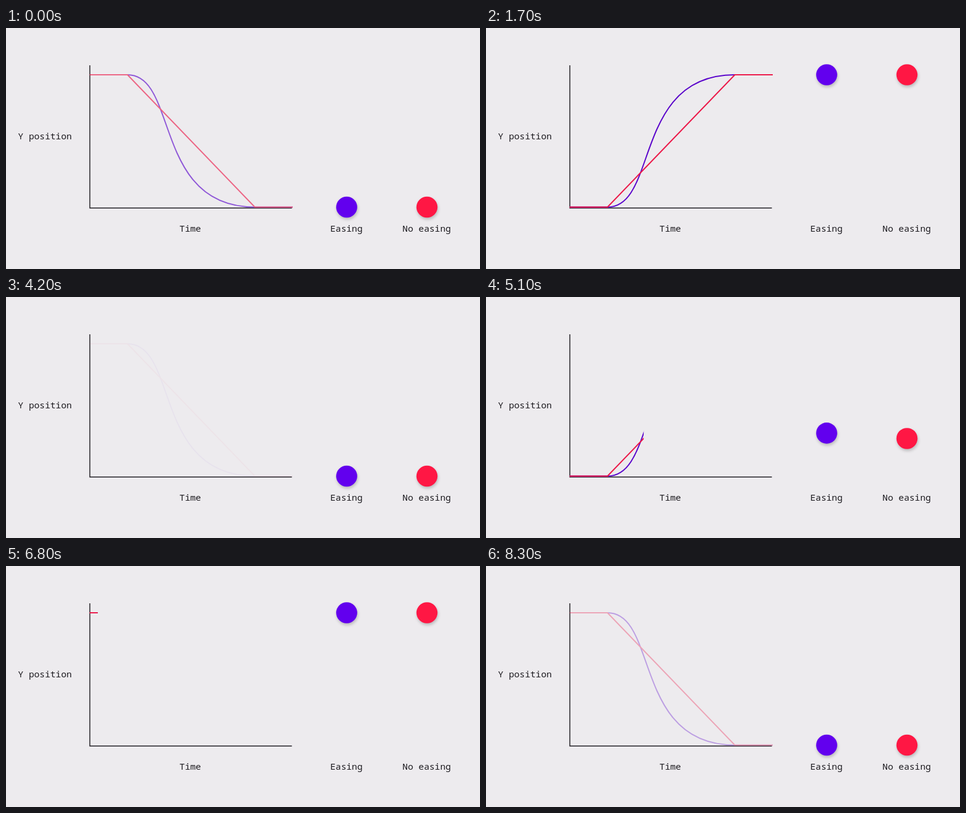
An HTML page that plays this animation: 800 by 407 pixels, repeating every 8.4 s.

```html
<!DOCTYPE html>
<html lang="en">
<head>
<meta charset="utf-8">
<title>Easing comparison</title>
<style>
  html, body { margin: 0; width: 100%; height: 100%; overflow: hidden; background: #edebee; }
  svg { display: block; width: 100%; height: 100%; }
  text { font: 500 15.15px "Roboto Mono", "Noto Sans Mono", "DejaVu Sans Mono", monospace; fill: #1c1a1f; text-anchor: middle; }
  path { fill: none; stroke-width: 2; stroke-linejoin: round; }
  circle { filter: drop-shadow(1px 3px 2.5px rgba(0, 0, 0, .22)); }
</style>
</head>
<body>
<svg viewBox="0 0 800 407">
  <clipPath id="reveal"><rect id="window" x="141" y="50" height="270"/></clipPath>
  <path d="M141.5 63V304H482.5" stroke="#1c1a1f" style="stroke-width:1.5;stroke-linejoin:miter"/>
  <g id="curves" clip-path="url(#reveal)">
    <path id="easedLine" stroke="#5a04cb"/>
    <path id="linearLine" stroke="#ec1848"/>
  </g>
  <text x="65.7" y="188">Y position</text>
  <text x="311" y="344">Time</text>
  <text x="574.5" y="344">Easing</text>
  <text x="710" y="344">No easing</text>
  <circle id="easedBall" cx="575" r="17.8" fill="#6200ee"/>
  <circle id="linearBall" cx="710.5" r="17.8" fill="#ff1744"/>
</svg>
<script>
const LOOP = 8400, STEP = 100;              // the picture advances ten times a second
const CYCLE = 4133.3, RISE_AT = 2132, START_PHASE = 1504;
const SPEED = 0.3695;                       // horizontal px per ms
const FADE_END = 1574, FADE_TIME = 111;
const LEFT = 141, RIGHT = 484, RAMP_START = 205, RAMP_END = 420;
const TOP = 79, BOTTOM = 302.5;

const byId = id => document.getElementById(id);
const clamp = v => Math.min(1, Math.max(0, v));
const mix = (a, b, k) => a + (b - a) * k;

// cubic-bezier(.4, 0, .2, 1), solved by bisection
function ease(x) {
  let lo = 0, hi = 1;
  for (let i = 0; i < 24; i++) {
    const s = (lo + hi) / 2, r = 1 - s;
    if (1.2 * r * r * s + 0.6 * r * s * s + s ** 3 < x) lo = s; else hi = s;
  }
  return 3 * (1 - lo) * lo * lo + lo ** 3;
}

function draw(time) {
  const phase = (time + START_PHASE) % CYCLE;
  const rising = phase >= RISE_AT;
  const elapsed = rising ? phase - RISE_AT : phase;
  const [from, to] = rising ? [BOTTOM, TOP] : [TOP, BOTTOM];
  const x = Math.min(RIGHT, LEFT + SPEED * elapsed);
  const progress = clamp((x - RAMP_START) / (RAMP_END - RAMP_START));
  const c1 = mix(RAMP_START, RAMP_END, 0.4), c2 = mix(RAMP_START, RAMP_END, 0.2);
  const lead = `M${LEFT} ${from}H${RAMP_START}`;

  byId('easedLine').setAttribute('d', `${lead}C${c1} ${from} ${c2} ${to} ${RAMP_END} ${to}H${RIGHT}`);
  byId('linearLine').setAttribute('d', `${lead}L${RAMP_END} ${to}H${RIGHT}`);
  byId('window').setAttribute('width', x - LEFT);
  byId('curves').setAttribute('opacity', clamp((FADE_END - elapsed) / FADE_TIME));
  byId('easedBall').setAttribute('cy', mix(from, to, ease(progress)));
  byId('linearBall').setAttribute('cy', mix(from, to, progress));
}

function tick() {
  const time = performance.now() % LOOP;
  draw(Math.floor(time / STEP) * STEP);
  requestAnimationFrame(tick);
}
draw(0);
requestAnimationFrame(tick);
</script>
</body>
</html>
```
